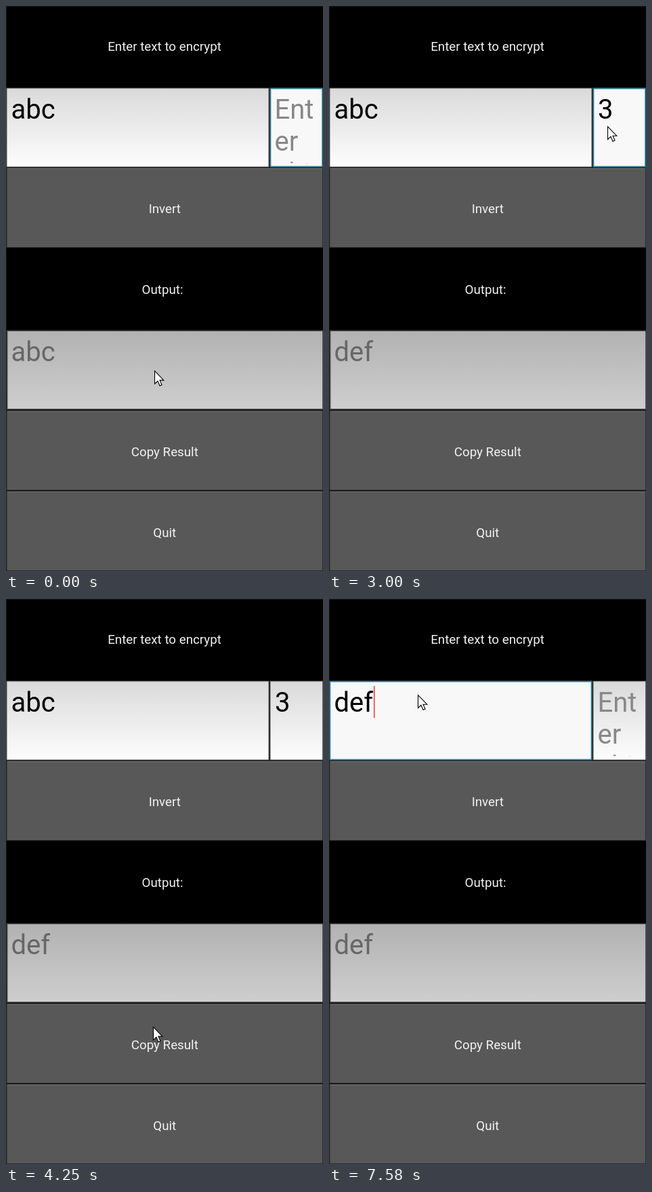
Write an HTML page that moves like this. It is 468 by 832 pixels and loops after 8 s.

```html
<!DOCTYPE html>
<html lang="en">
<head>
<meta charset="utf-8">
<title>Text shift</title>
<style>
  html, body { margin: 0; width: 100%; height: 100%; overflow: hidden; background: #000; }
  svg { display: block; width: 468px; height: 832px; font-family: Roboto, "Noto Sans", sans-serif; }
  .label { font-size: 18.75px; fill: #f2f2f2; text-anchor: middle; }
  .big { font-size: 40px; fill: #000; }
  .hint { fill: #888; }
  .off { fill: #676767; }
</style>
</head>
<body>
<svg viewBox="0 0 468 832">
  <defs>
    <linearGradient id="light" x2="0" y2="1">
      <stop stop-color="#dadada"/><stop offset="1" stop-color="#fdfdfd"/>
    </linearGradient>
    <linearGradient id="dim" x2="0" y2="1">
      <stop stop-color="#b2b2b2"/><stop offset="1" stop-color="#cecece"/>
    </linearGradient>
    <clipPath id="keyClip"><rect x="391" y="123" width="76" height="108.3"/></clipPath>
  </defs>
  <rect width="468" height="832"/>
  <path d="M0 .5H468M.5 0V832" stroke="#161616"/>
  <text class="label" x="234" y="66.3">Enter text to encrypt</text>
  <text class="label" x="231" y="424">Output:</text>
  <g id="buttons"></g>
  <g id="fields"></g>
  <g id="outBox">
    <rect x="1" y="477.5" width="467" height="117" fill="#4c4c4c"/>
    <rect x="2.5" y="479" width="464.5" height="114" fill="url(#dim)"/>
  </g>
  <text class="big" id="msg" x="7.5" y="165.5"></text>
  <text class="big hint" id="msgHint" x="7.5" y="165.5">Enter text to encrypt</text>
  <text class="big" id="key" x="397" y="165.5"></text>
  <g class="big hint" id="keyHint" clip-path="url(#keyClip)">
    <text x="396.5" y="165.5">Ent</text>
    <text x="396.5" y="213">er</text>
    <text x="396.5" y="260.3">shi</text>
  </g>
  <text class="big off" id="out" x="7.5" y="523.3"></text>
  <rect id="caret" y="128" width="1.4" height="47" fill="#e62a2a"/>
  <path id="mouse" d="M.5 .5V19.5L4.9 15.3L8 22.3L11 21L8 14.2H13.8Z" fill="#fff" stroke="#000" stroke-width="1.1"/>
</svg>
<script>
const LOOP = 8000, FRAME = 1000 / 12;
const $ = id => document.getElementById(id);

// time, message, shift key, focused field, pressed button
const states = [
  [-750, 'abc', '', 'key'],
  [1080, 'abc', '1', 'key'],
  [1580, 'abc', '', 'key'],
  [1830, 'abc', '2', 'key'],
  [2170, 'abc', '', 'key'],
  [2500, 'abc', '3', 'key'],
  [4000, 'abc', '3', '', 'copy'],
  [4250, 'abc', '3', ''],
  [5080, 'abc', '3', 'key'],
  [5500, 'abc', '', 'key'],
  [6330, 'abc', '', 'msg'],
  [6750, 'ab', '', 'msg'],
  [6920, 'a', '', 'msg'],
  [7170, '', '', 'msg'],
  [7500, 'de', '', 'msg'],
  [7580, 'def', '', 'msg']
];

// time, x, y
const path = [
  [0, 219, 537], [500, 411, 177],
  [3170, 411, 177], [3670, 216, 698], [3830, 217, 630],
  [4250, 217, 630], [4830, 418.5, 139],
  [5840, 418.5, 139], [6170, 131, 141]
];

const advance = { a: 21.8, b: 22.4, c: 20.9, d: 22.6, e: 21.2, f: 15 };

function addButton(id, y, text, base) {
  $('buttons').insertAdjacentHTML('beforeend', `
    <rect x="0.5" y="${y}" width="467.5" height="118" fill="#2b2b2b"/>
    <rect id="${id}" x="1.5" y="${y + 1}" width="465.5" height="116" fill="#585858"/>
    <path d="M2 ${y + 1.5}H467" stroke="#fff" stroke-opacity=".16"/>
    <text class="label" x="234.3" y="${base}">${text}</text>`);
}

function addField(id, x, w) {
  $('fields').insertAdjacentHTML('beforeend', `
    <rect x="${x}" y="120.5" width="${w}" height="117" fill="#5a5a5a"/>
    <rect x="${x + 1}" y="121.5" width="${w - 2}" height="115" fill="url(#light)"/>
    <g id="${id}Focus">
      <rect x="${x}" y="120.5" width="${w}" height="117" fill="#23586c"/>
      <rect x="${x + 1.5}" y="122" width="${w - 3}" height="114" fill="#f8f8f8" stroke="#55a9c8"/>
    </g>`);
}

addButton('invert', 238, 'Invert', 305.2);
addButton('copy', 595.5, 'Copy Result', 662.8);
addButton('quit', 714, 'Quit', 781.8);
addField('msg', 0.5, 388);
addField('key', 389.5, 78.5);

const encrypt = (s, n) =>
  s.replace(/./g, c => String.fromCharCode((c.charCodeAt(0) - 97 + n) % 26 + 97));

const show = (id, on) => $(id).setAttribute('visibility', on ? 'visible' : 'hidden');

function mouseAt(t) {
  const i = path.findIndex(p => p[0] > t);
  if (i < 0) return path[path.length - 1].slice(1);
  const [t0, x0, y0] = path[i - 1], [t1, x1, y1] = path[i];
  const u = (t - t0) / (t1 - t0), k = u * u * (3 - 2 * u);
  return [x0 + (x1 - x0) * k, y0 + (y1 - y0) * k];
}

function draw(now) {
  // the screen refreshes 12 times a second
  const t = Math.floor((now % LOOP + 4) / FRAME) * FRAME + 4;
  const [since, msg, key, focus, pressed] = states.filter(s => s[0] <= t).pop();

  $('msg').textContent = msg;
  $('key').textContent = key;
  $('out').textContent = encrypt(msg, +key);
  show('msgHint', !msg);
  show('keyHint', !key);
  show('msgFocus', focus === 'msg');
  show('keyFocus', focus === 'key');
  $('copy').setAttribute('fill', pressed === 'copy' ? '#32a4ce' : '#585858');

  const width = [...msg].reduce((w, c) => w + advance[c], 0);
  $('caret').setAttribute('x', focus === 'msg' ? 7.3 + width : key ? 418.8 : 396.4);
  show('caret', focus && Math.floor((t - since) / 500) % 2 === 0);

  const [x, y] = mouseAt(t);
  $('mouse').setAttribute('transform', `translate(${x} ${y})`);
}

const start = performance.now();
function tick() {
  draw(performance.now() - start);
  requestAnimationFrame(tick);
}
tick();
</script>
</body>
</html>
```
